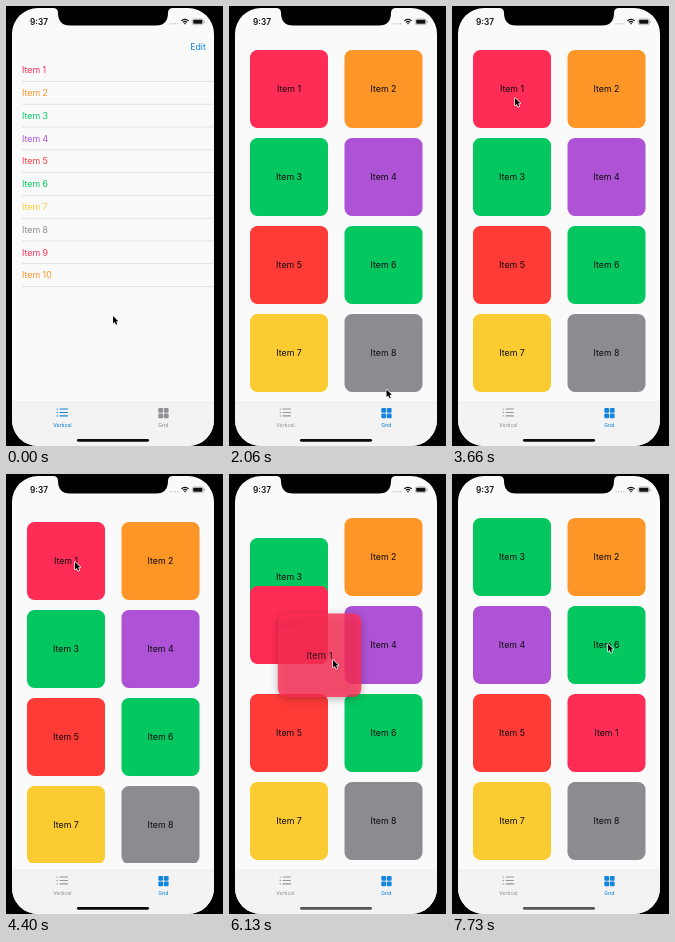
Write an HTML page with a canvas that moves like this. It is 217 px wide and 440 px high and loops after 8000 ms.

```html
<!DOCTYPE html>
<html lang="en">
<head>
<meta charset="utf-8">
<title>Reorderable grid</title>
<style>
  html, body { margin: 0; width: 100%; height: 100%; overflow: hidden; background: #000; }
  canvas { display: block; width: 217px; height: 440px; }
</style>
</head>
<body>
<canvas id="stage"></canvas>
<script>
const W = 217, H = 440, LOOP = 8000, FPS = 15;
const canvas = document.getElementById('stage');
const ctx = canvas.getContext('2d');
const dpr = Math.max(1, window.devicePixelRatio || 1);
canvas.width = W * dpr;
canvas.height = H * dpr;

const PINK = '#ff2d55', ORANGE = '#fd9527', GREEN = '#04c760', PURPLE = '#ae53d6';
const RED = '#ff3b38', YELLOW = '#fbcc32', GRAY = '#8b8b90', BLUE = '#1385de';
const COLORS = [PINK, ORANGE, GREEN, PURPLE, RED, GREEN, YELLOW, GRAY, PINK, ORANGE];

const CARD = 78, SWITCH = 1660, LIFT = 5050, DRAG = 5600, DROP = 7130, DROP_TIME = 270;
const SWAP_TIME = 300;
const SWAPS = [
  { at: 5926, other: 2, from: 0, to: 2 },
  { at: 6340, other: 3, from: 2, to: 3 },
  { at: 6790, other: 5, from: 3, to: 5 }
];

// Pointer tip: time, x, y
const POINTER = [
  [0, 107, 310], [130, 107, 310], [400, 110, 318], [600, 110, 318],
  [800, 121, 338], [1100, 154, 391], [1330, 165, 407], [1900, 165, 407],
  [2100, 150, 360], [2500, 81, 151], [2867, 63, 93], [3600, 63, 92],
  [4130, 68, 82], [4400, 69, 88], [4667, 68, 82], [5600, 68, 82],
  [5800, 73, 105], [6000, 84, 160], [6133, 104, 186], [6400, 150, 174],
  [6600, 158, 199], [6850, 162, 256], [7250, 163, 258], [7500, 159, 205],
  [7733, 156, 170]
];
const PULL = [[4130, 0], [4400, 4], [4667, 0]];

const lerp = (a, b, u) => a + (b - a) * u;
const ramp = (t, start, length) => {
  const u = Math.min(1, Math.max(0, (t - start) / length));
  return u * u * (3 - 2 * u);
};

function sample(keys, t) {
  const next = keys.findIndex(k => k[0] > t);
  if (next === 0) return keys[0].slice(1);
  if (next < 0) return keys[keys.length - 1].slice(1);
  const a = keys[next - 1], b = keys[next];
  const u = (t - a[0]) / (b[0] - a[0]);
  return a.slice(1).map((v, i) => lerp(v, b[i + 1], u));
}

function box(x, y, w, h, r, fill) {
  ctx.fillStyle = fill;
  ctx.beginPath();
  ctx.roundRect(x, y, w, h, r);
  ctx.fill();
}

function text(str, x, y, size, color, align = 'center', weight = 400) {
  ctx.font = `${weight} ${size}px Inter, "Liberation Sans", sans-serif`;
  ctx.textAlign = align;
  ctx.textBaseline = 'alphabetic';
  ctx.fillStyle = color;
  ctx.fillText(str, x, y + size * 0.36);
}

function drawStatusBar() {
  ctx.fillStyle = '#000';
  ctx.beginPath();
  ctx.moveTo(47, 0);
  ctx.lineTo(47, 2);
  ctx.quadraticCurveTo(52, 2, 52, 7);
  ctx.bezierCurveTo(52, 15, 56, 19.5, 64, 19.5);
  ctx.lineTo(150, 19.5);
  ctx.bezierCurveTo(158, 19.5, 162, 15, 162, 7);
  ctx.quadraticCurveTo(162, 2, 167, 2);
  ctx.lineTo(167, 0);
  ctx.fill();

  text('9:37', 33, 16, 8.3, '#111', 'center', 600);
  for (let i = 0; i < 4; i++) box(163.5 + i * 2.5, 17, 1.5, 1.5, 0.7, '#c4c4c6');

  ctx.strokeStyle = '#111';
  ctx.lineWidth = 1.3;
  for (const r of [2.7, 4.9]) {
    ctx.beginPath();
    ctx.arc(179, 18.2, r, -Math.PI * 0.76, -Math.PI * 0.24);
    ctx.stroke();
  }
  box(178.2, 16.8, 1.6, 1.6, 0.8, '#111');

  ctx.strokeStyle = '#999';
  ctx.lineWidth = 0.6;
  ctx.beginPath();
  ctx.roundRect(186.3, 12.9, 11, 5.8, 1.6);
  ctx.stroke();
  box(187.2, 13.8, 9.2, 4, 0.8, '#111');
  box(197.9, 14.9, 0.8, 1.9, 0.4, '#999');
}

function drawList() {
  text('Edit', 192, 41, 8.8, BLUE);
  COLORS.forEach((color, i) => {
    const y = 64 + i * 22.8;
    text('Item ' + (i + 1), 16, y, 8.8, color, 'left');
    ctx.fillStyle = '#d9d9db';
    ctx.fillRect(16, y + 11, 192, 0.7);
  });
}

function slotCenter(slot) {
  return [60 + (slot % 2) * 94.5, 83 + Math.floor(slot / 2) * 88];
}

function itemCenter(item, t) {
  let [x, y] = slotCenter(item);
  for (const s of SWAPS) {
    if (item !== 0 && item !== s.other) continue;
    const [from, to] = item === 0 ? [s.from, s.to] : [s.to, s.from];
    const a = slotCenter(from), b = slotCenter(to), u = ramp(t, s.at, SWAP_TIME);
    x += (b[0] - a[0]) * u;
    y += (b[1] - a[1]) * u;
  }
  return [x, y];
}

function drawCard(item, x, y, size = CARD, labelAlpha = 1) {
  box(x - size / 2, y - size / 2, size, size, 7.5 * size / CARD, COLORS[item]);
  ctx.shadowColor = 'transparent';
  text('Item ' + (item + 1), x, y, 8.8 * size / CARD, `rgba(12,10,14,${labelAlpha})`);
}

function drawLifted(t) {
  const lift = ramp(t, LIFT, 350), drop = ramp(t, DROP, DROP_TIME);
  const home = itemCenter(0, t);
  const [px, py] = sample(POINTER, t - 30);
  const held = t < DRAG ? home : [px - 9, py + 1];
  const size = CARD + 5.5 * lift * (1 - drop);
  ctx.save();
  ctx.globalAlpha = 1 - 0.2 * ramp(t, DRAG, 200) * (1 - drop);
  ctx.shadowColor = `rgba(0,0,0,${0.32 * lift * (1 - drop)})`;
  ctx.shadowBlur = 9 * dpr;
  ctx.shadowOffsetY = 2 * dpr;
  drawCard(0, lerp(held[0], home[0], drop), lerp(held[1], home[1], drop), size);
  ctx.restore();
}

function drawGrid(t) {
  const [pull] = sample(PULL, t);
  const active = t >= LIFT && t < DROP + DROP_TIME;
  ctx.save();
  ctx.beginPath();
  ctx.rect(6, 43.7, 202, 345.3);
  ctx.clip();
  for (let item = 7; item >= 0; item--) {
    const [x, y] = itemCenter(item, t);
    drawCard(item, x, y + pull, CARD, active && item === 0 ? 0.3 : 1);
  }
  if (active && t < DRAG) drawLifted(t);
  ctx.restore();
  if (active && t >= DRAG) drawLifted(t);
}

function drawTabBar(gridOpen, t) {
  const listColor = gridOpen ? '#98989b' : BLUE;
  const gridColor = gridOpen ? BLUE : '#919194';
  ctx.fillStyle = '#f3f3f4';
  ctx.fillRect(6, 396, 202, 44);
  ctx.fillStyle = '#e3e3e5';
  ctx.fillRect(6, 395.7, 202, 0.6);

  for (let i = 0; i < 3; i++) {
    const y = 402.4 + i * 3.4;
    box(50.5, y, 1.5, 1.4, 0.7, listColor);
    box(53.5, y + 0.1, 8.5, 1.1, 0.5, listColor);
  }
  for (let i = 0; i < 4; i++) {
    box(152.3 + (i % 2) * 5.5, 402 + (i >> 1) * 5.5, 4.8, 4.8, 1, gridColor);
  }
  text('Vertical', 56.3, 418.7, 5, listColor, 'center', 500);
  text('Grid', 157.4, 418.7, 5, gridColor, 'center', 500);
  box(71, 433, 72, 2.7, 1.35, t < 5900 ? '#090909' : '#555558');
}

function drawPointer(x, y) {
  ctx.save();
  ctx.translate(x, y);
  ctx.beginPath();
  ctx.moveTo(0, 0);
  for (const [px, py] of [[0, 7.4], [1.7, 5.9], [3, 8.8], [4.3, 8.2], [3, 5.4], [5.3, 5.3]]) {
    ctx.lineTo(px, py);
  }
  ctx.closePath();
  ctx.lineJoin = 'round';
  ctx.lineWidth = 1.3;
  ctx.strokeStyle = '#fff';
  ctx.stroke();
  ctx.fillStyle = '#000';
  ctx.fill();
  ctx.restore();
}

function draw(t) {
  ctx.setTransform(dpr, 0, 0, dpr, 0, 0);
  ctx.fillStyle = '#000';
  ctx.fillRect(0, 0, W, H);
  ctx.save();
  ctx.beginPath();
  ctx.roundRect(6, 2, 202, 438, 26);
  ctx.clip();
  ctx.fillStyle = '#fafafb';
  ctx.fillRect(0, 0, W, H);

  const gridOpen = t >= SWITCH;
  if (gridOpen) drawGrid(t);
  else drawList();
  drawTabBar(gridOpen, t);
  drawStatusBar();
  drawPointer(...sample(POINTER, t));
  ctx.restore();
}

const start = performance.now();
function tick() {
  const t = (performance.now() - start) % LOOP;
  draw(Math.floor((t + 4) * FPS / 1000) * 1000 / FPS % LOOP);
  requestAnimationFrame(tick);
}
tick();
</script>
</body>
</html>
```
